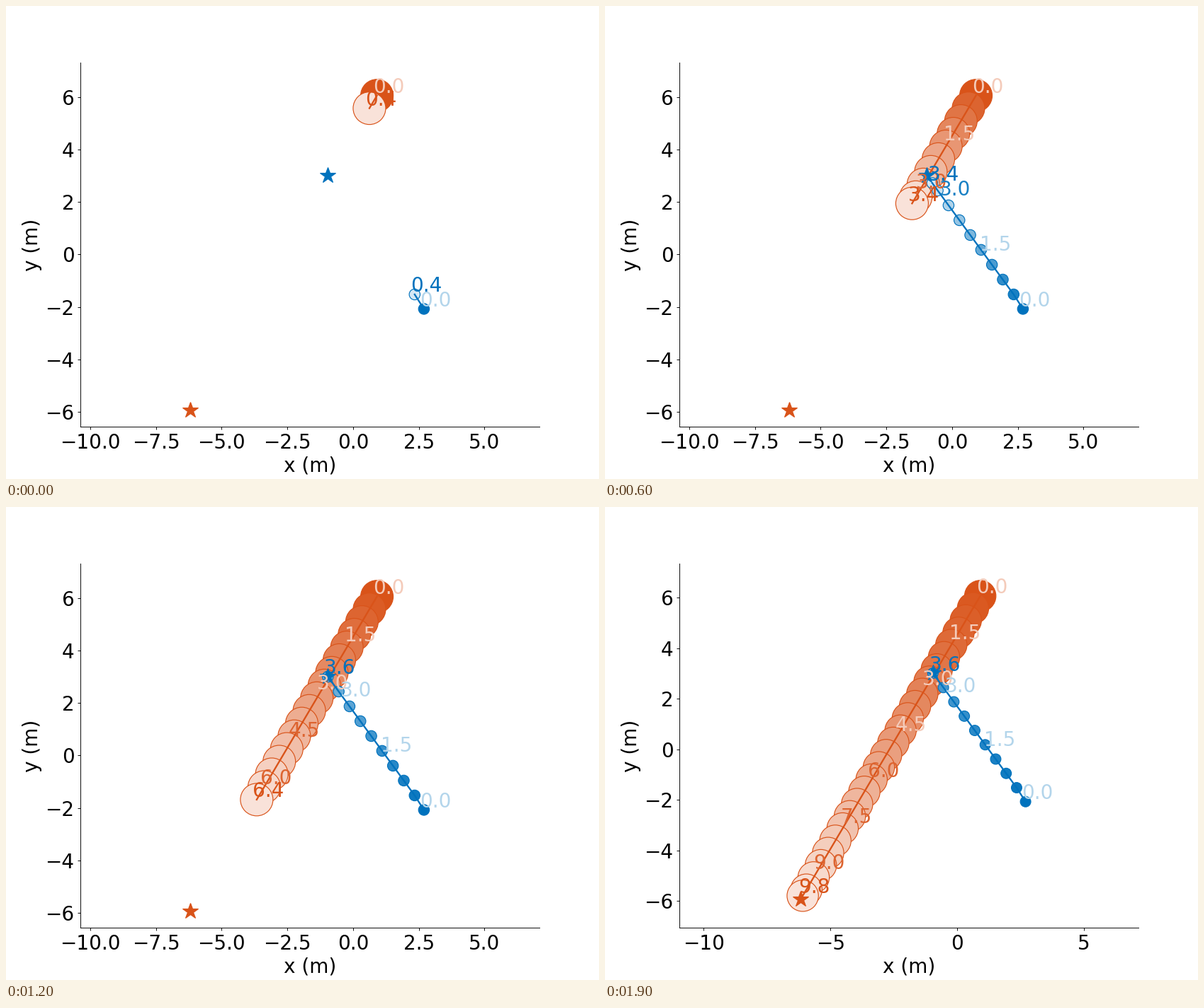
A matplotlib script for the animation above (2.9 s loop, 837 by 669 pixels).

```python
import numpy as np
import matplotlib.pyplot as plt
from matplotlib.animation import FuncAnimation

DPI = 83.7
EPS = 1e-6  # keeps the pixel size from truncating down
FRAMES, INTERVAL = 29, 100
ASPECT = (10 * 0.775) / (8 * 0.77)

plt.rcParams.update({
    "font.family": "DejaVu Sans",
    "font.size": 24,
    "axes.spines.top": False,
    "axes.spines.right": False,
})

# Each agent follows straight legs through its (time, x, y) waypoints.
ORANGE = dict(
    color=(0.85, 0.325, 0.098), radius=0.62, goal=(-6.185, -5.95),
    path=np.array([(0, 0.909, 6.063), (9.8, -6.095, -5.80)]),
)
BLUE = dict(
    color=(0.0, 0.447, 0.741), radius=0.207, goal=(-0.966, 3.01),
    path=np.array([(0, 2.697, -2.077), (0.4, 2.344, -1.524), (3.6, -0.958, 3.007)]),
)
AGENTS = (ORANGE, BLUE)


def position(agent, t):
    times, xs, ys = agent["path"].T
    return np.interp(t, times, xs), np.interp(t, times, ys)


def tint(color, alpha):
    """Blend a colour onto white."""
    return tuple(alpha * c + 1 - alpha for c in color)


def marks(end, step):
    return np.arange(0, end - 1e-3, step)


def draw_agent(ax, agent, now):
    color = agent["color"]
    end = min(now, agent["path"][-1, 0])
    span = 1.2 * now

    trail = np.linspace(0, end, round(end * 10) + 1)
    ax.plot(*position(agent, trail), color=color, lw=2)
    ax.plot(*agent["goal"], color=color, marker="*", markersize=20)

    for t in [*marks(end, 0.4), end]:
        ax.add_patch(plt.Circle(position(agent, t), agent["radius"],
                                fc=tint(color, 1 - t / span), ec=color))

    def stamp(t, shade):
        x, y = position(agent, t)
        ax.text(x - 0.15, y + 0.1, f"{t:.1f}", color=shade)

    for t in marks(end, 1.5):
        stamp(t, tint(color, 0.3 if t / span < 0.5 else 0.9))
    stamp(end, color)


def fit_view(ax, now):
    """Equal-scale view around everything drawn so far, with 5% margins."""
    x, y = position(ORANGE, now)
    r = ORANGE["radius"]
    left = min(ORANGE["goal"][0], x - r)
    right = BLUE["path"][0, 1] + BLUE["radius"]
    low = min(ORANGE["goal"][1], y - r)
    high = ORANGE["path"][0, 2] + r

    pad = 0.05 * (high - low)
    half = ASPECT * (high - low + 2 * pad) / 2
    mid = (left + right) / 2
    ax.set_xticks(np.arange(-10, 5.1, 2.5 if half < 8.8 else 5))
    ax.set_yticks(np.arange(-6, 7, 2))
    ax.set_xlim(mid - half, mid + half)
    ax.set_ylim(low - pad, high + pad)


def draw(i):
    now = min(0.4 + 0.5 * i, 9.8)
    ax.clear()
    for agent in AGENTS:
        draw_agent(ax, agent, now)
    fit_view(ax, now)
    ax.set_xlabel("x (m)")
    ax.set_ylabel("y (m)")


fig, ax = plt.subplots(figsize=(837 / DPI + EPS, 669 / DPI + EPS), dpi=DPI)
anim = FuncAnimation(fig, draw, frames=FRAMES, init_func=lambda: draw(0),
                     interval=INTERVAL, repeat=True, repeat_delay=0)
plt.show()
```
